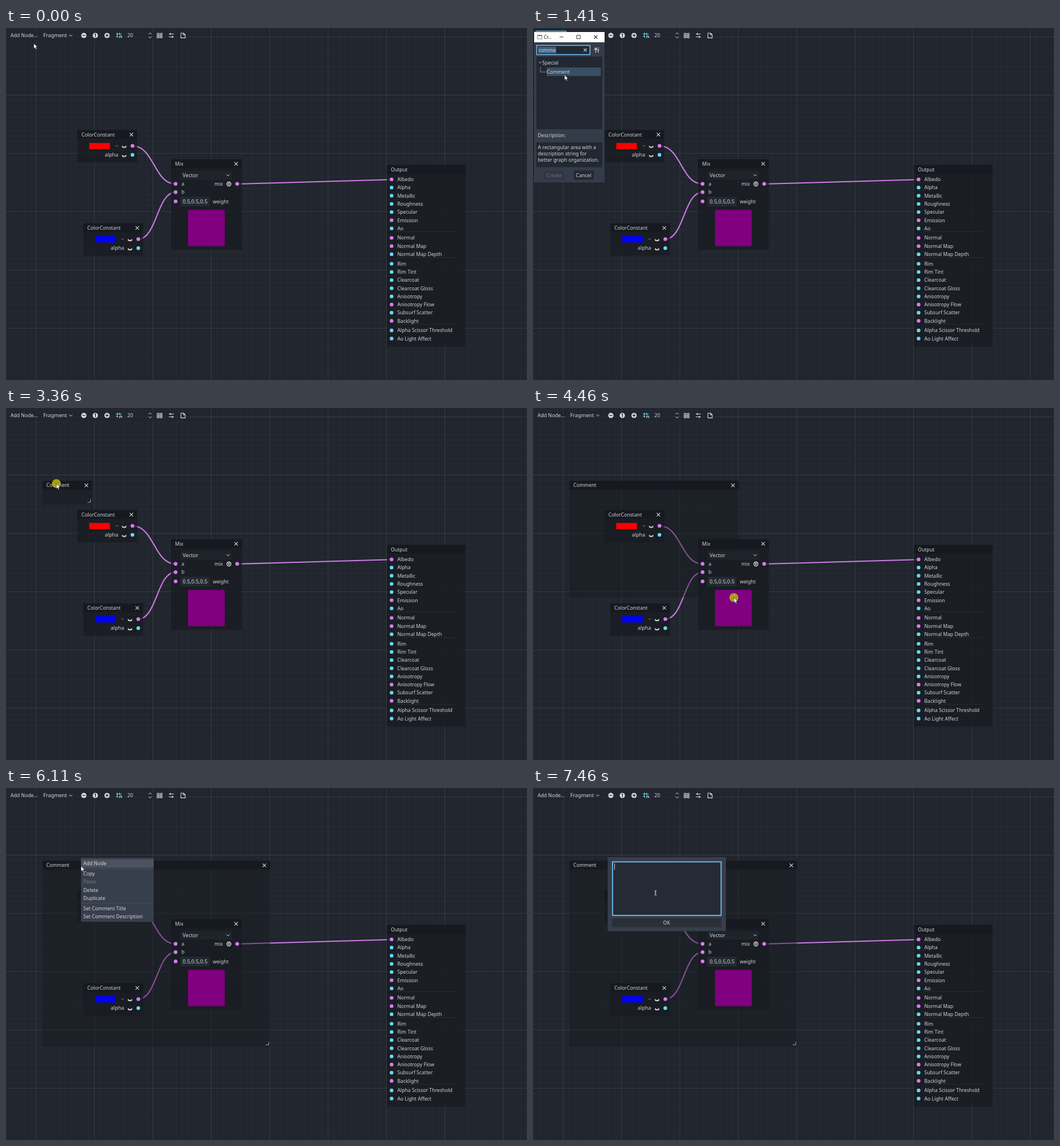
Write an HTML page that moves like this. It is 910x616 px and loops after 8000 ms.

```html
<!DOCTYPE html>
<html lang="en">
<head>
<meta charset="utf-8">
<title>Comment node</title>
<style>
html, body { margin: 0; width: 100%; height: 100%; overflow: hidden; background: #21262e; }
svg { display: block; width: 910px; height: 616px; }
text { font: 8.65px "Noto Sans", sans-serif; fill: #d3d5d8; white-space: pre; }
</style>
</head>
<body>
<svg id="stage" viewBox="0 0 910 616"></svg>
<script>
const PINK = '#d67dee', CYAN = '#61daf5', INK = '#d8dadd', BLUE = '#6fbdf5';
const CELL = 10.2, LOOP = 8000;

// Shape helpers
const rect = (x, y, w, h, fill, more = '') =>
  `<rect x="${x}" y="${y}" width="${w}" height="${h}" fill="${fill}" ${more}/>`;
const text = (x, y, s, more = '') => `<text x="${x}" y="${y + 3.1}" ${more}>${s}</text>`;
const line = (d, color = INK, w = 1, more = '') =>
  `<path d="${d}" fill="none" stroke="${color}" stroke-width="${w}" ${more}/>`;
const dot = (x, y, r, fill) => `<circle cx="${x}" cy="${y}" r="${r}" fill="${fill}"/>`;
const port = (x, y, color = PINK) => dot(x, y, 3.2, color);
const cross = (x, y, r = 3, color = INK) =>
  line(`M${x - r} ${y - r}l${2 * r} ${2 * r}m0 ${-2 * r}l${-2 * r} ${2 * r}`, color, 1.1);
const chevron = (x, y, r = 2.8, color = INK) =>
  line(`M${x - r} ${y - r / 2}l${r} ${r}l${r} ${-r}`, color);
const group = (id, body) => `<g id="${id}">${body}</g>`;

function grid() {
  let minor = '', major = '';
  for (let i = -5; i < 86; i++) {
    const d = `M${(52.6 + i * CELL).toFixed(1)} 0v616`;
    i % 10 ? minor += d : major += d;
  }
  for (let i = -1; i < 60; i++) {
    const d = `M0 ${(15.4 + i * CELL).toFixed(1)}h910`;
    i % 10 ? minor += d : major += d;
  }
  return line(minor, '#fff', .8, 'opacity=".04"') + line(major, '#fff', .9, 'opacity=".11"');
}

function toolbar() {
  const disc = (x, mark) => dot(x, 13, 4.6, INK) + line(mark, '#21262e', 1.3);
  return rect(0, 4, 319, 18, '#21262e', 'opacity=".55"') +
    text(8, 13, 'Add Node...') + text(65, 13, 'Fragment', 'style="font-size:9.1px"') + chevron(113, 13) +
    disc(136, 'M133.4 13h5.2') + disc(156, 'M154.8 11.2l1.5-.8v5.4') +
    disc(176.5, 'M173.9 13h5.2m-2.6-2.6v5.2') +
    line('M194.5 8v9m4-9v4M192 10.5h10M192 14.5h4', CYAN) +
    line('M198.5 17.5v-2a1.7 1.7 0 0 1 3.4 0v2', INK, 1.3) +
    text(212, 13, '20') +
    line('M249 11l2.7-2.7l2.7 2.7M249 15l2.7 2.7l2.7-2.7') +
    line('M264 9q4.3 1.5 8.6 0v8.5q-4.3-1.5-8.6 0zM264 12q4.3 1 8.6 0M264 15q4.3-1 8.6 0M266.8 9.6v7.6M270 9.6v7.6') +
    line('M284.5 10.5h8.5M284.5 15.5h8.5M288 8.6l-2.6 1.9l2.6 1.9M289.6 13.6l2.6 1.9l-2.6 1.9') +
    line('M305.5 9h4.7l2.8 2.8v5.6h-7.5zM310 9v3h3', INK, 1.1);
}

function node(x, y, w, h, title, closable = true) {
  return rect(x, y, w, h, '#191c22', 'opacity=".78"') +
    rect(x, y, w, 15.3, '#16191f') + text(x + 7.2, y + 8, title) +
    (closable ? cross(x + w - 10, y + 8) : '');
}

const closedEye = (x, y) =>
  line(`M${x - 3.8} ${y - 1.2}q3.8 4.6 7.6 0M${x - 2.4} ${y + .6}l-.8 1.3M${x} ${y + 1.2}v1.6M${x + 2.4} ${y + .6}l.8 1.3`, '#f0f0f0', 1.2);

function colorNode(x, y, color) {
  return node(x, y, 104.5, 56.5, 'ColorConstant') +
    rect(x + 20.8, y + 22.6, 36.2, 10.8, color) + chevron(x + 68.8, y + 27.6, 2, '#8d9197') +
    closedEye(x + 81.8, y + 29) + port(x + 96.3, y + 27.6) +
    text(x + 48, y + 43.2, 'alpha', 'style="font-size:9px"') + closedEye(x + 81.8, y + 45) + port(x + 96.3, y + 43.4, CYAN);
}

function mixNode() {
  return node(288, 229.6, 124, 158.6, 'Mix') +
    rect(304.6, 250, 90, 15, '#1f242b') +
    text(308.5, 257.5, 'Vector', 'style="font-size:9.1px"') + chevron(388, 257.5) +
    port(296.2, 272.8) + text(306.5, 272.8, 'a') + text(364, 272.8, 'mix') +
    `<circle cx="389.3" cy="273" r="3.5" fill="none" stroke="#f0f0f0" stroke-width="1.3"/>` +
    dot(389.3, 273, 1.4, '#f0f0f0') + port(403.8, 272.8) +
    port(296.2, 287.2) + text(306.5, 287.2, 'b') +
    port(296.2, 303.4) + rect(304.6, 295.5, 51, 16.5, '#242a32') +
    text(308.5, 304, '0.5,0.5,0.5', 'style="font-size:9.1px"') + text(361.2, 303.4, 'weight') +
    rect(318, 318.3, 64, 63.5, '#800080');
}

function outputNode() {
  const groups = [
    ['*Albedo', 'Alpha', 'Metallic', 'Roughness', 'Specular', '*Emission', 'Ao'],
    ['*Normal', '*Normal Map', 'Normal Map Depth'],
    ['Rim', 'Rim Tint', 'Clearcoat', 'Clearcoat Gloss', 'Anisotropy', '*Anisotropy Flow', 'Subsurf Scatter', '*Backlight'],
    ['Alpha Scissor Threshold', 'Ao Light Affect']
  ];
  let y = 265, out = node(665, 239.6, 137.5, 318, 'Output', false);
  groups.forEach((rows, i) => {
    if (i) {
      out += rect(683, y - 8.9, 103, .8, '#2b3037');
      y += 2.4;
    }
    for (const row of rows) {
      out += port(673.5, y, row[0] === '*' ? PINK : CYAN) + text(683.5, y, row.replace('*', ''));
      y += 14.28;
    }
  });
  return out;
}

const wire = (x, y, x2, y2) => {
  const m = (x + x2) / 2;
  return line(`M${x} ${y}C${m} ${y} ${m} ${y2} ${x2} ${y2}`, '#d07ae6', 2.1);
};

const comment = () =>
  rect(0, 0, 87, 42, '#14171c', 'id="area" opacity=".4"') + rect(0, 0, 87, 15.3, '#16191f', 'id="bar"') +
  text(7.2, 8, 'Comment') + group('shut', cross(0, 8)) +
  group('grip', line('M-8.5-4.2h5.3v-5.3', '#a5a8ad', 1));

function createDialog() {
  return rect(2, 7, 123, 263, '#353c49') + rect(2, 7, 123, 18, '#fff') +
    rect(7.5, 12, 8.5, 7.5, '#777c82') + rect(8.3, 14, 6.9, 4.7, '#eceff1') +
    text(19, 16, 'Cr...', 'style="fill:#222;font-size:8px"') +
    line('M46.5 15.7h6.5M76.5 12.7h6v6h-6z', '#222', .9) + cross(109.5, 15.8, 3, '#222') +
    rect(6.5, 30.5, 93, 16, '#222831', 'id="search"') + rect(9, 33, 31.5, 11.5, '#40617c', 'id="mark"') +
    text(9.5, 38.6, 'comme') + cross(91.3, 38.5, 2.7) +
    line('M109.6 34v3.5m0 2v3.5M114 34v2m0 3v4M108 35.5v2.4h3.2v-2.4M112.6 38h2.8', INK, 1.3) +
    rect(6, 50, 115, 127, '#222831', 'id="tree"') +
    chevron(12.4, 60.5, 2) + text(16, 60.5, 'Special') + line('M13 68v9h11', '#8d939c', .9) +
    rect(24, 69, 94.5, 15, '#384f65') + text(24, 76.8, 'Comment') +
    text(8.3, 188, 'Description:') + rect(6, 200, 115, 43.5, '#222831') +
    ['A rectangular area with a', 'description string for', 'better graph organization.']
      .map((s, i) => text(8.5, 208.7 + i * 11.2, s)).join('') +
    rect(19, 249.5, 36, 16, '#303742') + text(37, 257.5, 'Create', 'id="create" text-anchor="middle"') +
    rect(71, 249.5, 35, 16, '#232931') + text(88.5, 257.5, 'Cancel', 'text-anchor="middle"');
}

function menu() {
  const items = [['Add Node', 132], ['Copy', 150], ['Paste', 164.2], ['Delete', 178.5],
    ['Duplicate', 192.8], ['Set Comment Title', 210.4], ['Set Comment Description', 224.8]];
  return rect(131, 122, 127, 112.3, '#383f4c') + rect(131, 0, 127, 14, '#4c535f', 'id="hover"') +
    rect(133, 140.6, 123, .8, '#4b525e') + rect(133, 201.3, 123, .8, '#4b525e') +
    items.map(([s, y]) => text(135, y, s, s === 'Paste' ? 'style="fill:#737984"' : '')).join('');
}

const editor = () =>
  rect(130.5, 121, 206.5, 129.5, '#363e4b') +
  rect(139, 129.3, 189.5, 93.6, '#252b34', `stroke="${BLUE}" stroke-width="1.8"`) +
  rect(142, 132, .9, 11, INK) + rect(138, 228, 191, 15.6, '#2a303a') +
  text(233.3, 235.8, 'OK', 'text-anchor="middle"');

const $ = id => document.getElementById(id);
$('stage').innerHTML =
  rect(0, 0, 910, 616, '#21262e') + grid() +
  wire(221, 206.3, 296.2, 272.8) + wire(231, 369.4, 296.2, 287.2) +
  line('M403.8 273L673.5 265.2', '#d07ae6', 2.1) +
  group('comment', comment()) +
  colorNode(124.6, 178.6, '#f00') + colorNode(134.8, 341.8, '#00f') + mixNode() + outputNode() +
  toolbar() + rect(5, 5.5, 53, 15.5, 'none', `id="focus" stroke="${BLUE}" stroke-width="1.4" rx=".8"`) +
  group('dialog', createDialog()) + group('menu', menu()) + group('editor', editor()) +
  group('pointer', `<circle id="press" r="7.8" fill="#b5b010" opacity=".88"/>` +
    `<path id="arrow" d="M0 0v9.2l2.1-1.9l1.5 3.3l1.6-.7l-1.5-3.2l2.8-.2z" fill="#fff" stroke="#111" stroke-width=".6"/>` +
    group('beam', line('M-2-4q2 0 2 1v6q0 1-2 1M2-4q-2 0-2 1v6q0 1 2 1', '#d5d7da', .9)));

// Pointer stops: time, x, y
const PATH = [
  [70, 48.5, 27], [350, 31, 14], [920, 31, 15], [1340, 55, 82], [1740, 55, 82],
  [2190, 429.5, 264], [2400, 443.5, 282], [2600, 443.5, 282], [3290, 88, 132.3], [3560, 88, 132.3],
  [3850, 145, 163], [3920, 145, 163], [4320, 329, 308], [4720, 459.5, 450], [4820, 459.5, 450],
  [5140, 250, 265], [5230, 246, 260], [5490, 131, 136.5], [6110, 131, 136.5], [6480, 167, 223],
  [6860, 167, 223], [7130, 296, 241], [7460, 214, 183.5]
];
const PRESSES = [[420, 560], [1530, 1600], [1670, 1740], [2600, 3560], [3900, 4790], [5690, 5890], [6720, 6860]];

function pointerAt(t) {
  const i = PATH.findIndex(p => p[0] > t);
  if (i === 0) return PATH[0].slice(1);
  if (i < 0) return PATH[PATH.length - 1].slice(1);
  const [t0, x0, y0] = PATH[i - 1], [t1, x1, y1] = PATH[i];
  const u = (t - t0) / (t1 - t0), k = u + (u * u * (3 - 2 * u) - u) * .6;
  return [x0 + (x1 - x0) * k, y0 + (y1 - y0) * k];
}

const snap = v => Math.round(v / CELL) * CELL;
const within = (t, a, b) => t >= a && t < b;
const show = (id, on) => $(id).setAttribute('display', on ? 'inline' : 'none');
const move = (id, x, y) => $(id).setAttribute('transform', `translate(${x} ${y})`);
const paint = (id, attrs) => Object.entries(attrs).forEach(([k, v]) => $(id).setAttribute(k, v));

function placeComment(t) {
  let x = 63.4, y = 127.3, w = 87, h = 42;
  if (t < 2670) {
    x = 418.6; y = 277;
  } else if (t < 3290) {
    const [px, py] = pointerAt(t);
    x += snap(px - 88); y += snap(py - 132.3);
  } else if (t >= 3990) {
    const [px, py] = pointerAt(Math.min(t, 4720));
    w = snap(px + 4 - x); h = snap(py + 4 - y);
  }
  move('comment', x, y);
  paint('area', { width: w, height: h });
  paint('bar', { width: w });
  move('shut', w - 10, 0);
  move('grip', w + (w > 90 ? .8 : .4), h);
}

function draw(time) {
  const t = Math.floor(time / 10) * 10, step = t - (t - 70) % 70;
  const [x, y] = pointerAt(within(t, 70, 7460) ? Math.max(70, step) : t);
  move('pointer', x, y);
  const typing = t >= 7000 && within(x, 139, 329) && within(y, 129, 223);
  show('arrow', !typing);
  show('beam', typing);
  show('press', PRESSES.some(([a, b]) => within(t, a, b)));

  show('focus', within(t, 420, 2600));
  show('dialog', within(t, 620, 1740));
  const picked = t >= 1530;
  paint('search', { stroke: picked ? 'none' : BLUE, 'stroke-width': 1.6 });
  paint('tree', { stroke: picked ? BLUE : 'none', 'stroke-width': .9 });
  show('mark', !picked);
  $('create').style.fill = picked ? '#d3d5d8' : '#6a717c';

  show('comment', t >= 1740);
  placeComment(step);

  show('menu', within(t, 5890, 6860));
  const rows = [132, 150, 164.2, 178.5, 192.8, 210.4, 224.8];
  const row = rows.find(r => Math.abs(r - y) < 7.2);
  show('hover', row && row !== 164.2 && t > 6000);
  paint('hover', { y: (row || 132) - 7 });
  show('editor', t >= 6930);
}

const start = performance.now();
(function tick() {
  draw((performance.now() - start) % LOOP);
  requestAnimationFrame(tick);
})();
</script>
</body>
</html>
```
